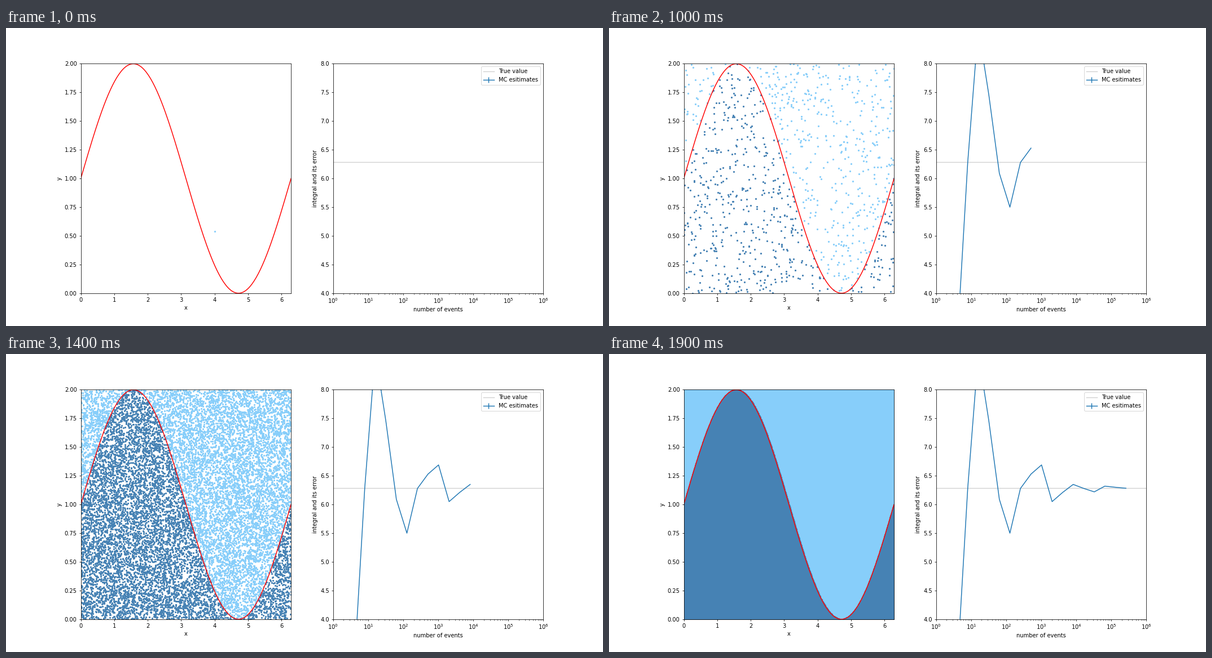
Recreate the animation shown at these times as a matplotlib script. Size 1058 by 529 pixels, loop 2 s.

```python
import numpy as np
import matplotlib.pyplot as plt
from matplotlib.animation import FuncAnimation

WIDTH, HEIGHT = 1058, 529
DPI = WIDTH / 15
FRAMES, INTERVAL = 20, 100
X_MAX, Y_MAX = 2 * np.pi, 2
AREA = X_MAX * Y_MAX
DOT_SIZE = 5

# Estimates swing around the true value, then settle on it
SWING = [0, 0, 3.14, 6.28, 8.64, 7.46, 6.09, 5.50, 6.28,
         6.53, 6.69, 6.05, 6.21, 6.35, 6.28, 6.22, 6.32, 6.30]
ESTIMATES = np.full(FRAMES, X_MAX)
ESTIMATES[:len(SWING)] = SWING
EVENTS = 2 ** np.arange(FRAMES)


def curve(x):
    return 1 + np.sin(x)


def sample(step):
    """Random points below and above the curve that give the estimate."""
    rng = np.random.default_rng(step)
    count = EVENTS[step]
    hits = round(count * ESTIMATES[step] / AREA)
    pool = rng.random((3 * count + 20, 2)) * (X_MAX, Y_MAX)
    is_below = pool[:, 1] < curve(pool[:, 0])
    return pool[is_below][:hits], pool[~is_below][:count - hits]


plt.rcParams["font.size"] = 10.1
fig, (left, right) = plt.subplots(1, 2, figsize=(WIDTH / DPI, HEIGHT / DPI),
                                  dpi=DPI)
fig.subplots_adjust(left=0.1253)

x = np.linspace(0, X_MAX, 200)
left.plot(x, curve(x), color="red")
left.set(xlim=(0, X_MAX), ylim=(0, Y_MAX), xlabel="x", ylabel="y")
above_dots = left.scatter([], [], s=DOT_SIZE, color="lightskyblue")
below_dots = left.scatter([], [], s=DOT_SIZE, color="steelblue")

right.axhline(X_MAX, color="lightgray", label="True value")
bars = right.errorbar([1], [0], yerr=[0], label="MC esitimates")
trace = bars.lines[0]
right.set(xscale="log", xlim=(1, 1e6), ylim=(4, 8),
          xlabel="number of events", ylabel="integral and its error")
right.legend(loc="upper right")


def update(step):
    below, above = sample(step)
    below_dots.set_offsets(below)
    above_dots.set_offsets(above)
    trace.set_data(EVENTS[:step], ESTIMATES[:step])
    return below_dots, above_dots, trace


anim = FuncAnimation(fig, update, frames=FRAMES, interval=INTERVAL,
                     repeat=True, blit=False)
plt.show()
```
